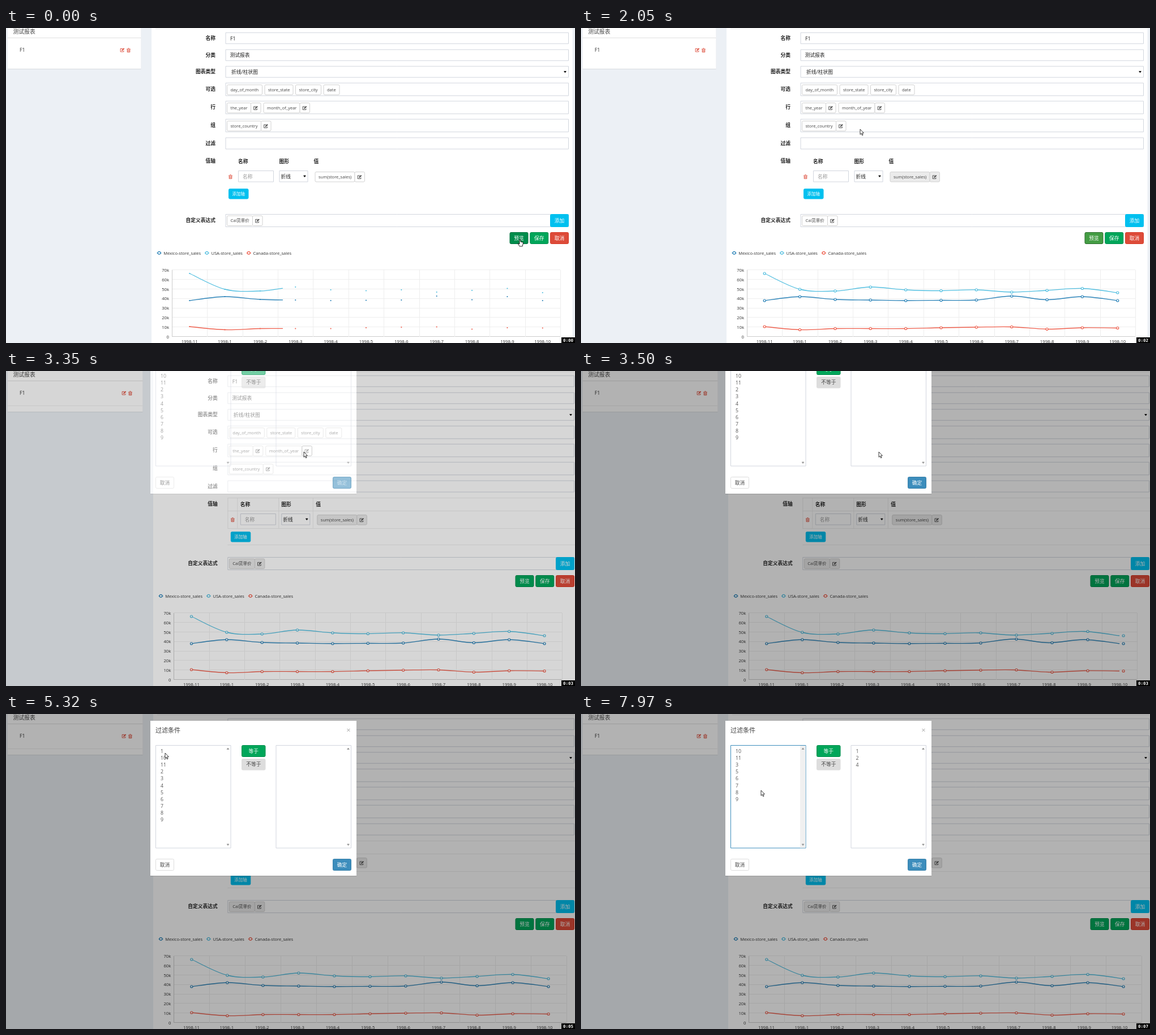
Animation of 1005 by 557 pixels, one loop 8000 ms. Source, as an HTML page with a canvas:

```html
<!DOCTYPE html>
<html lang="zh-CN">
<head>
<meta charset="utf-8">
<style>
html, body { margin: 0; width: 1005px; height: 557px; overflow: hidden; }
canvas { display: block; }
</style>
</head>
<body>
<canvas width="1005" height="557"></canvas>
<script>
const ctx = document.querySelector('canvas').getContext('2d');
const FONT = '"Open Sans", "Noto Sans CJK SC", "Noto Sans CJK", sans-serif';
const LOOP = 8000, STEP = 150;
const OPEN = 3350, SHOWN = 3500;  // dialog starts fading in, dialog opaque

// Pointer moves: [start, end, x, y]
const MOVES = [[1350, 2000, 493, 179], [2000, 2350, 441, 141], [2450, 2900, 526, 143],
  [4200, 5300, 281, 69], [5600, 6050, 280, 89], [6600, 7100, 279, 105], [7600, 7850, 318, 135]];
// Options picked in the dialog: [time, option]
const PICKS = [[5450, 1], [6050, 2], [7100, 4]];
const SERIES = [
  { name: 'Mexico-store_sales', color: '#2b83b8', ys: [482, 475, 480, 481, 482, 481.5, 481, 474, 480.5, 475, 482] },
  { name: 'USA-store_sales', color: '#53bfe0', ys: [434, 462, 465, 458, 463, 464.5, 463, 467, 464, 460.5, 468] },
  { name: 'Canada-store_sales', color: '#ee5f4d', ys: [528, 533.5, 531.5, 531.5, 531.5, 530, 529, 528.5, 532.5, 530, 530.5] }];

const ramp = (t, a, b) => Math.max(0, Math.min(1, (t - a) / (b - a)));
const mix = (a, b, k) => a + (b - a) * k;

function text(str, x, y, { size = 8.75, color = '#222', align = 'left', weight = 400, font = FONT } = {}) {
  ctx.font = `${weight} ${size}px ${font}`;
  ctx.textAlign = align;
  ctx.fillStyle = color;
  ctx.fillText(str, x, y + size * 0.37);
  return ctx.measureText(str).width;
}
const bold = (str, x, y, align) => text(str, x, y, { weight: 700, align });

function rect(x, y, w, h, color) {
  ctx.fillStyle = color;
  ctx.fillRect(x, y, w, h);
}
function box(x, y, w, h, fill, stroke = '#d2d6de', r = 0) {
  ctx.beginPath();
  ctx.roundRect(x + 0.5, y + 0.5, w - 1, h - 1, r);
  ctx.fillStyle = fill;
  ctx.fill();
  ctx.lineWidth = 1;
  ctx.strokeStyle = stroke;
  ctx.stroke();
}
function button(label, x, y, w, h, fill, { stroke = fill, color = '#fff', size } = {}) {
  box(x, y, w, h, fill, stroke, 2);
  text(label, x + w / 2, y + h / 2, { size, color, align: 'center' });
}
function polygon(points, fill, stroke = fill) {
  ctx.beginPath();
  points.forEach(p => ctx.lineTo(...p));
  ctx.closePath();
  ctx.fillStyle = fill;
  ctx.fill();
  ctx.lineWidth = 0.9;
  ctx.strokeStyle = stroke;
  ctx.stroke();
}
function triangle(x, y, dir, color) {
  polygon([[x - 1.8, y - dir], [x + 1.8, y - dir], [x, y + 1.5 * dir]], color);
}
function editIcon(x, y, color = '#444') {
  ctx.strokeStyle = color;
  ctx.lineWidth = 0.9;
  ctx.stroke(new Path2D(`M${x + 1} ${y - 2.6}h-4.3v5.6h5.7v-2.2`));
  ctx.lineWidth = 1.7;
  ctx.stroke(new Path2D(`M${x - 1} ${y + 1}l4.2 -3.8`));
}
function trashIcon(x, y) {
  ctx.strokeStyle = '#dd4b39';
  ctx.lineWidth = 0.9;
  ctx.stroke(new Path2D(`M${x - 3.3} ${y - 2}h6.6m-4.5 -1.3h2.4m-3.5 1.5v5.2h4.6v-5.2m-3.1 1.2v2.9m1.6 0v-2.9`));
}

// Draws a tag, with an edit button if asked, and returns where the next one goes
function chip(label, x, y, { edit = false, fill = '#fff', editFill = fill, editStroke = '#d2d2d2' } = {}) {
  ctx.font = `7.5px ${FONT}`;
  const w = Math.round(ctx.measureText(label).width) + 13;
  box(x, y - 9, w, 18.5, fill, '#d2d2d2', 2);
  text(label, x + 6.5, y, { size: 7.5, color: '#444' });
  if (!edit) return x + w + 3.5;
  box(x + w - 1, y - 9, 18.5, 18.5, editFill, editStroke, 2);
  editIcon(x + w + 8, y + 0.5);
  return x + w + 21.5;
}

function sidebar(open) {
  const w = 235.5 + 3 * open;
  rect(0, 0, 1005, 557, '#ecf0f5');
  rect(3, 0, w, 73, '#d9dde1');
  rect(3, 0, w, 72, '#fff');
  rect(3, 17, w, 1, '#e0e0e0');
  if (open) rect(3, 61, w, 1, '#eee');
  text('测试报表', 12.5, 6.5, { size: 9.8, color: '#444' });
  text('F1', 24, 39, { color: '#333' });
  editIcon(w - 30, 39, '#dd4b39');
  trashIcon(w - 19, 39.3);
}

function form(t, open) {
  const shift = 3.8 * open;
  const right = 994 + 10 * open;
  const end = right - shift;
  rect(257 + 3 * open, 0, 743.5 + 2 * open, 557, '#fff');
  rect(264 + 3 * open, 1, 737, 1, '#eee');

  ctx.save();
  ctx.translate(shift, 0);
  [['名称', 18, 20.5], ['分类', 48, 20.5], ['图表类型', 77.5, 20.5], ['可选', 108.5, 23.5],
    ['行', 140.5, 23.5], ['组', 172.5, 23.5], ['过滤', 204, 21], ['自定义表达式', 340.5, 23]].forEach(([label, y, h]) => {
    bold(label, 370, y - 0.5, 'right');
    box(387.5, y - h / 2, end - 387.5, h, '#fff');
  });
  bold('值轴', 370, 234.5, 'right');
  text('F1', 396, 18.5);
  text('测试报表', 395.5, 48);
  text('折线/柱状图', 398, 78);
  triangle(end - 6.5, 77.5, 1, '#111');

  const flow = (y, labels, options) => labels.reduce((x, label) => chip(label, x, y, options), 390);
  flow(109, ['day_of_month', 'store_state', 'store_city', 'date']);
  const next = flow(141, ['the_year'], { edit: true });
  const hovered = t >= 2800 && !open;
  chip('month_of_year', next, 141, { edit: true, fill: hovered ? '#f2f2f2' : '#fff',
    editFill: t >= 3200 && !open ? '#d4d4d4' : '#fff', editStroke: t >= 3200 ? '#8c8c8c' : '#d2d2d2' });
  flow(173, ['store_country'], { edit: true });

  if (open) {
    for (const y of [224, 247, 278, 307]) rect(387.5, y, 620, 1, '#ececec');
    for (const x of [387.5, 404.5, 477.5, 538]) rect(x, 224, 1, 54, '#ececec');
  }
  bold('名称', 410, 235.5);
  bold('图形', 482.5, 235.5);
  bold('值', 543.5, 235.5);
  trashIcon(396.5, 263);
  box(410, 252, 63, 20.5, '#fff');
  text('名称', 418, 262.5, { color: '#999' });
  box(482.5, 252, 51, 20.5, '#fff');
  text('折线', 485.5, 263);
  triangle(527.5, 262, 1, '#111');
  const grey = '#ebebeb';
  chip('sum(store_sales)', 545.5, 263, { edit: true, fill: open || (t >= 1700 && t < 2300) ? grey : '#fff' });
  button('添加轴', 393, 284, 35.5, 18.5, '#00c0ef', { size: 7.5 });
  flow(340.5, ['Cal货单价'], { edit: true, fill: open ? grey : '#fff' });
  ctx.restore();

  button('添加', right - 33, 329, 33, 23, '#00c0ef');
  const preview = t < 1400 ? ['#008d4c', '#00713d'] : t < 3200 ? ['#449d44', '#2b6b2b'] : ['#00a65a', '#008d4c'];
  [['预览', ...preview], ['保存', '#00a65a', '#008d4c'], ['取消', '#dd4b39', '#d73925']].forEach(([label, fill, stroke], i) =>
    button(label, right - 104.5 + i * 35.75, 361, 33, 21, fill, { stroke }));
}

function ring(x, y, r, color) {
  ctx.beginPath();
  ctx.arc(x, y, r, 0, 7);
  ctx.fillStyle = '#fff';
  ctx.fill();
  ctx.lineWidth = 1.2;
  ctx.strokeStyle = color;
  ctx.stroke();
}
function smoothLine(pts, color) {
  const at = i => pts[Math.max(0, Math.min(pts.length - 1, i))];
  ctx.beginPath();
  ctx.moveTo(...pts[0]);
  for (let i = 1; i < pts.length; i++) {
    const [a, b, c, d] = [at(i - 2), at(i - 1), at(i), at(i + 1)];
    ctx.bezierCurveTo(b[0] + (c[0] - a[0]) / 6, b[1] + (c[1] - a[1]) / 6,
      c[0] - (d[0] - b[0]) / 6, c[1] - (d[1] - b[1]) / 6, ...c);
  }
  ctx.lineWidth = 1.3;
  ctx.strokeStyle = color;
  ctx.stroke();
}
function chart(t, open) {
  const left = 293 + 3.3 * open;
  const narrow = 62.36, wide = 63.03;
  const col = mix(narrow, wide, ramp(t, SHOWN, 3800));
  const symbolCol = t >= SHOWN ? wide : narrow;
  const centre = (i, w) => left + (i + 0.5) * w;

  let x = 270.5 + 3 * open;
  for (const { name, color } of SERIES) {
    rect(x - 4, 397.3, 8, 1.2, color);
    ring(x, 397.8, 2.4, color);
    x += text(name, x + 7.7, 398, { size: 7.5, color: '#333' }) + 18.5;
  }
  for (let i = 0; i < 8; i++) {
    const y = 545 - i * 16.8;
    rect(left, Math.round(y), col * 11, 1, i ? '#eee' : '#ccc');
    text(i ? i * 10 + 'k' : '0', left - 5, y + 0.8, { size: 7.7, color: '#333', align: 'right' });
  }
  for (let i = 0; i < 12; i++) rect(Math.round(left + i * col), 428, 1, 118, i ? '#eee' : '#ccc');
  for (let i = 0; i < 11; i++) {
    text('1998-' + (i || 11), centre(i, narrow), 554.5, { size: 7.7, color: '#333', align: 'center' });
  }

  const reveal = mix(489, 1000, ramp(t, 0, 650));
  const radius = mix(0.5, 2, ramp(t, 500, 800));
  for (const { ys, color } of SERIES) {
    ctx.save();
    ctx.beginPath();
    ctx.rect(left, 420, reveal - left, 126);
    ctx.clip();
    smoothLine(ys.map((y, i) => [centre(i, col), y]), color);
    ctx.restore();
    ys.forEach((y, i) => ring(centre(i, symbolCol), y, radius, color));
  }
}

function listBox(x, items, focused) {
  box(x, 55, 133.5, 182.5, 'transparent', focused ? '#3c8dbc' : '#d2d6de');
  if (focused) rect(x + 123, 56, 9.5, 180.5, '#f0f0f0');
  triangle(x + 128, 61.5, -1, '#999');
  triangle(x + 128, 231, 1, '#999');
  items.forEach((n, i) => text(n, x + 9, 65.7 + i * 12.13, { color: '#555' }));
}
function dialog(t) {
  const fading = t < SHOWN;
  const drop = -69 * (1 - ramp(t, SHOWN, 3800)) ** 2;

  // The backdrop leaves out the area behind the dialog
  ctx.beginPath();
  ctx.rect(0, 0, 1005, 557);
  ctx.rect(255, 12 + drop, 364, 274);
  ctx.fillStyle = `rgba(0,0,0,${fading ? 0.16 : 0.3})`;
  ctx.fill('evenodd');

  ctx.save();
  ctx.globalAlpha = fading ? 0.55 : 1;
  ctx.translate(0, drop);
  rect(255, 286, 364, 1, 'rgba(0,0,0,.15)');
  rect(255, 12, 364, 274, '#fff');
  text('过滤条件', 264, 28.5, { size: 11, color: '#444' });
  text('×', 605, 28, { size: 13, color: '#bbb', align: 'center', weight: 600 });
  const picked = PICKS.filter(p => t >= p[0]).map(p => p[1]);
  const options = [1, 10, 11, 2, 3, 4, 5, 6, 7, 8, 9];
  listBox(264, options.filter(n => !picked.includes(n)), picked.length > 0);
  listBox(476.5, picked, false);
  button('等于', 416, 55, 42.5, 21, '#00a65a', { stroke: '#008d4c' });
  button('不等于', 416, 79, 42.5, 20.5, '#ddd', { color: '#444' });
  button('取消', 264, 256, 33, 21, '#fff', { stroke: '#ddd', color: '#444' });
  button('确定', 577, 256, 33, 21, '#3c8dbc', { stroke: '#367fa9' });
  ctx.restore();
}

function pointer(t) {
  let x = 908, y = 374;
  for (const [start, end, toX, toY] of MOVES) {
    const k = ramp(t, start, end);
    x = mix(x, toX, k);
    y = mix(y, toY, k);
  }
  ctx.save();
  ctx.translate(x, y);
  const hand = t < 1400 || (t >= 2300 && t < OPEN);
  if (hand) polygon([[-1, 0], [0.6, 0], [1, 4], [5.6, 5.2], [4.2, 12], [-1, 12], [-4, 7], [-1, 8]], '#fff', '#111');
  else polygon([[0, 0], [0, 9.3], [2.1, 7.4], [3.6, 10.8], [5.1, 10.1], [3.6, 6.9], [6.4, 6.7]], '#fff', '#222');
  ctx.restore();
}

function clock(t) {
  rect(981, 547, 24, 10, '#000');
  text('0:0' + Math.floor((t + 170) / 1021), 993, 552,
    { size: 7.5, color: '#fff', align: 'center', weight: 700, font: '"DejaVu Sans Mono", monospace' });
}

function draw(now) {
  const t = Math.max(0, Math.floor((now - 50) / STEP) * STEP + 50);
  const open = t >= OPEN ? 1 : 0;
  sidebar(open);
  form(t, open);
  chart(t, open);
  if (open) dialog(t);
  pointer(t);
  clock(now);
}
function tick() {
  draw(performance.now() % LOOP);
  requestAnimationFrame(tick);
}
tick();
</script>
</body>
</html>
```
